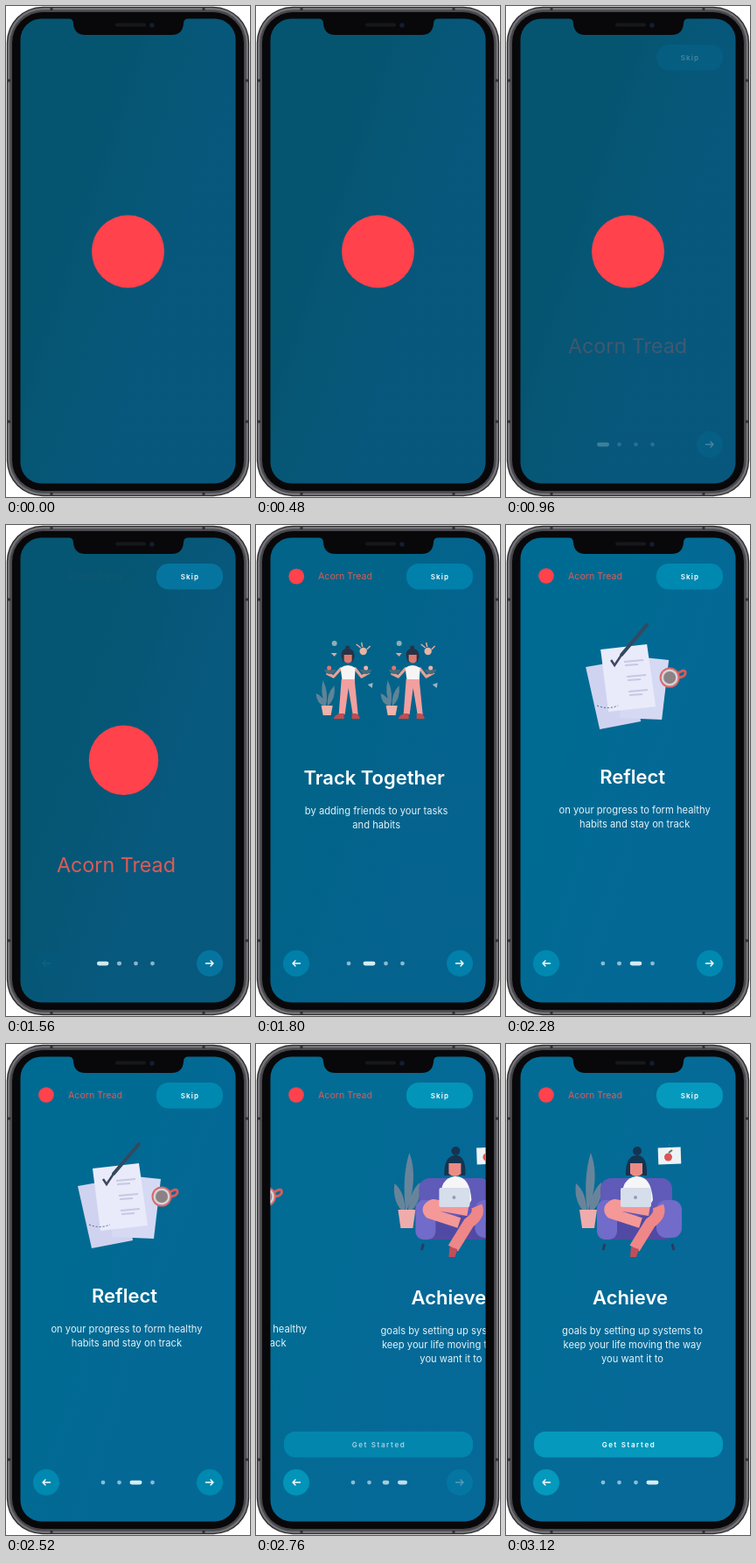
Write an HTML page that moves like this. It is 279 px wide and 560 px high and loops after 3240 ms.

```html
<!DOCTYPE html>
<html lang="en">
<head>
<meta charset="utf-8">
<title>Onboarding</title>
<style>
  html, body { margin: 0; width: 100%; height: 100%; overflow: hidden; background: #fff; }
  svg { display: block; width: 100%; height: 100%; }
  text { font-family: Inter, "Open Sans", sans-serif; text-anchor: middle; fill: #fff; }
  .heading { font-size: 22px; font-weight: 600; }
  .body { font-size: 11.2px; fill: #e3f3f8; }
  .label { font-size: 8px; font-weight: 600; letter-spacing: 1.2px; }
  .brand { fill: #dc5b56; }
  .arrow { fill: none; stroke: #fff; stroke-width: 1.4; stroke-linecap: round; stroke-linejoin: round; }
</style>
</head>
<body>
<svg viewBox="0 0 279 560">
  <defs>
    <clipPath id="screen"><rect x="16.500" y="14.500" width="246" height="530" rx="24"/></clipPath>
    <linearGradient id="sheen" gradientUnits="userSpaceOnUse" x1="40" y1="270" x2="230" y2="333">
      <stop offset=".1" stop-color="#1060a0" stop-opacity="0"/>
      <stop offset=".75" stop-color="#1060a0" stop-opacity=".25"/>
    </linearGradient>
    <g id="juggler">
      <g fill="#5e8498">
        <path d="M79 207Q72 191 76 177Q83 192 79 207M79 207Q68 204 68 192Q78 196 79 207M81 207Q80 192 89 183Q91 198 81 207"/>
      </g>
      <path d="M74 206h13l-2 11h-9z" fill="#eeb3a9"/>
      <path d="M97 163L88 173L80 169M112 163L120 173L129 168" fill="none" stroke="#e7a196" stroke-width="3.2" stroke-linejoin="round"/>
      <path d="M77 165h14q-2 5-7 5t-7-5M118 165h14q-2 5-7 5t-7-5" fill="#426c7e"/>
      <circle cx="83" cy="163" r="2.5" fill="#e5756e"/><circle cx="125" cy="163" r="2.5" fill="#e8b4a8"/>
      <path d="M96 163q8-6 17 0l-1 15h-14z" fill="#f6f5f4"/>
      <path d="M97 176h15l4 40h-6l-5-30l-4 30h-7z" fill="#f2a09f"/>
      <path d="M88 221q1-4 7-6h5v6zM109 215h5q4 2 4 6h-9z" fill="#c14c4c"/>
      <path d="M97 150q-1-9 7-9t8 9l-2 6h-11z" fill="#283246"/>
      <path d="M100 148h9v7q-4 5-9 0z" fill="#dd7a70"/>
      <circle cx="104" cy="140" r="2.5" fill="#283246"/>
      <circle cx="89" cy="135" r="3" fill="#8eaeb9"/>
      <path d="M85 146h7l-3 4z" fill="#e5a59c"/>
      <circle cx="122" cy="144" r="4.2" fill="#e7b5a4"/><path d="M119 140l-5-4M121 139l-1-5M126 142l4-4" stroke="#e9aaa0" stroke-width="1.4"/>
      <path d="M127 182l6-2l-1 6z" fill="#9db6c4"/>
    </g>
  </defs>

  <!-- phone body: dark rim, bright metal, darker metal, bezel -->
  <rect x=".8" y=".8" width="277.4" height="558.4" rx="41" fill="#2a2a2d"/>
  <rect x="2" y="2" width="275" height="556" rx="40" fill="#737378"/>
  <rect x="4.500" y="4.500" width="270" height="551" rx="37.500" fill="#48484c"/>
  <rect x="7" y="7" width="265" height="546" rx="35" fill="#08080a"/>
  <path d="M1 85H5M274 85H278M1 474H5M274 474H278M52 1V5M226 1V5M52 555V559M226 555V559" stroke="#303034" stroke-width="3"/>

  <g clip-path="url(#screen)">
    <rect id="backdrop" x="16" y="14" width="247" height="531"/>
    <rect x="16" y="14" width="247" height="531" fill="url(#sheen)"/>

    <g class="page"><text id="title" class="brand" x="139" y="396" font-size="23.3">Acorn Tread</text></g>

    <g class="page">
      <use href="#juggler"/><use href="#juggler" x="74"/>
      <text class="heading" x="134.5" y="296">Track Together</text>
      <text class="body" x="137" y="330">by adding friends to your tasks</text>
      <text class="body" x="137" y="346">and habits</text>
    </g>

    <g class="page"><g transform="translate(-9)">
      <path d="M91 162L143 153L154 224L107 233Z" fill="#cfd3ef"/>
      <path d="M137 149L186 154L178 222L130 220Z" fill="#d6d9f3"/>
      <path d="M108 142L161 136L171 207L117 213Z" fill="#e9ebfb"/>
      <path d="M135 156l22-2M136 160l15-1M138 173l22-2M139 177l15-1M140 190l22-2M141 194l15-1" stroke="#c5c9e2" stroke-width="2"/>
      <path d="M104 206q12 5 24 0" fill="none" stroke="#59618c" stroke-dasharray="2 2"/>
      <path d="M120 154l4 6l8-12" fill="none" stroke="#3e4760" stroke-width="2.5"/>
      <path d="M132 148L161 114" stroke="#33495f" stroke-width="4" stroke-linecap="round"/>
      <path d="M195 170q10-7 10-1q0 4-8 5" fill="none" stroke="#d75c59" stroke-width="3"/>
      <circle cx="187" cy="174" r="11.5" fill="#d9696a"/><circle cx="187" cy="174" r="9.5" fill="#d5d3d7"/><circle cx="187" cy="174" r="7" fill="#8c8286"/>
      <text class="heading" x="144.5" y="295">Reflect</text>
      <text class="body" x="147" y="329">on your progress to form healthy</text>
      <text class="body" x="147" y="345">habits and stay on track</text>
    </g></g>

    <g class="page">
      <g fill="#68849a">
        <path d="M93 193Q88 151 97 124Q108 154 93 193M92 194Q77 181 80 159Q93 170 92 194M95 194Q97 168 109 158Q112 181 95 194"/>
      </g>
      <path d="M84 189h20l-3 21h-14z" fill="#efacad"/>
      <rect x="174" y="118" width="26" height="19" fill="#edf2f6" transform="rotate(-2 187 128)"/>
      <path d="M187 118v-5" stroke="#426f8a"/>
      <circle cx="185.5" cy="129" r="4.5" fill="#da5557"/><path d="M186 124l4-3" stroke="#517f62" stroke-width="2"/>
      <path d="M113 228l-2 7M190 228l2 7" stroke="#263d63" stroke-width="3"/>
      <rect x="108" y="153" width="82" height="52" rx="12" fill="#605ab8"/>
      <rect x="116" y="196" width="72" height="27" rx="5" fill="#514aa4"/>
      <rect x="104" y="178" width="23" height="45" rx="9" fill="#716bc9"/>
      <rect x="172" y="178" width="29" height="43" rx="11" fill="#716bc9"/>
      <path d="M137 150q-1-22 12-23t12 23z" fill="#143451"/><circle cx="150" cy="122" r="5" fill="#143451"/>
      <path d="M142 136h14v12q-7 6-14 0z" fill="#ec8b85"/>
      <path d="M132 179q0-27 17-28t19 27l-4 7h-29z" fill="#f6f5f7"/>
      <path d="M174 185q4 10-9 19l-18 29" fill="none" stroke="#ef8788" stroke-width="13" stroke-linejoin="round"/>
      <path d="M164 190L124 183q-9 4-4 10l34 11" fill="none" stroke="#f59898" stroke-width="12" stroke-linejoin="round"/>
      <path d="M143 231l9 3l-3 9h-7z" fill="#bf4e5a"/>
      <rect x="131" y="164" width="35" height="22" rx="2" fill="#d5deea"/><circle cx="148" cy="175" r="2" fill="#8f9eb9"/>
      <text class="heading" x="142" y="297">Achieve</text>
      <text class="body" x="144.5" y="331">goals by setting up systems to</text>
      <text class="body" x="144.5" y="347">keep your life moving the way</text>
      <text class="body" x="144.5" y="363">you want it to</text>
    </g>

    <circle id="mark" fill="#ff424b"/>
    <text id="headerName" class="brand" x="102" y="62" font-size="10.6">Acorn Tread</text>

    <g id="controls">
      <rect class="button" x="172" y="44" width="76" height="29.5" rx="14"/>
      <text class="label" x="210.5" y="62">Skip</text>
      <g id="dots"></g>
      <g id="next"><circle class="button" cx="233" cy="500" r="15"/><path class="arrow" d="M228.5 500h8.5m-3-3l3 3l-3 3"/></g>
    </g>
    <g id="back"><circle class="button" cx="46" cy="500" r="15"/><path class="arrow" d="M50.5 500h-8.5m3-3l-3 3l3 3"/></g>
    <g id="start">
      <rect class="button" x="32" y="442" width="216" height="29.5" rx="13"/>
      <text class="label" x="140.5" y="460" style="letter-spacing:1.6px">Get Started</text>
    </g>
  </g>

  <path d="M72 14Q77 15 77 20Q78 33 91 33H189Q202 33 203 20Q203 15 208 14Z" fill="#08080a"/>
  <rect x="125" y="19.5" width="35" height="4" rx="2" fill="#17181b"/>
  <circle cx="167" cy="22" r="2.7" fill="#141d33"/>
</svg>
<script>
const LOOP = 3240, STEP = 120, PITCH = 245, SLIDE = 300;
const SLIDE_STARTS = [1511, 2021, 2580];
const BACKDROPS = [[5, 85, 113], [1, 100, 136], [0, 107, 146], [3, 108, 149]];
const BUTTONS = [[5, 116, 159], [0, 128, 170], [0, 137, 176], [4, 153, 189]];
const DOT_X = [111, 129.5, 148.5, 167.5];

const $ = id => document.getElementById(id);
const all = selector => [...document.querySelectorAll(selector)];
const set = (node, values) => {
  for (const key in values) node.setAttribute(key, values[key]);
};
const clamp = v => Math.min(1, Math.max(0, v));
const lerp = (a, b, p) => a + (b - a) * p;
const ease = v => {
  const u = clamp(v);
  return u < .5 ? 2 * u * u : 1 - 2 * (1 - u) ** 2;
};
const near = (i, scroll) => clamp(1 - Math.abs(i - scroll));

function tint(colors, position) {
  const i = Math.min(2, Math.floor(position));
  const mixed = colors[i].map((c, k) => lerp(c, colors[i + 1][k], position - i));
  return `rgb(${mixed.map(Math.round)})`;
}

const pages = all(".page"), buttons = all(".button");
const dots = DOT_X.map(() => {
  const dot = document.createElementNS("http://www.w3.org/2000/svg", "rect");
  set(dot, { y: 497.7, height: 4.8, rx: 2.4, fill: "#e0f5fa" });
  return $("dots").appendChild(dot);
});

function draw(time) {
  const scroll = SLIDE_STARTS.reduce((sum, start) => sum + ease((time - start) / SLIDE), 0);
  const appear = ease((time - 850) / SLIDE);
  const docked = clamp(scroll), last = clamp(scroll - 2);

  set($("backdrop"), { fill: tint(BACKDROPS, scroll) });
  buttons.forEach(b => set(b, { fill: tint(BUTTONS, scroll) }));
  pages.forEach((page, i) => set(page, { transform: `translate(${(i - scroll) * PITCH})` }));
  set($("mark"), { cx: lerp(139.5, 46, docked), cy: lerp(280, 58, docked), r: lerp(41.5, 8.8, docked) });

  set($("title"), { opacity: appear });
  set($("controls"), { opacity: appear });
  set($("headerName"), { opacity: docked });
  set($("back"), { opacity: docked });
  set($("next"), { opacity: 1 - last });
  set($("start"), { opacity: last });

  dots.forEach((dot, i) => {
    const active = near(i, scroll), width = lerp(4.8, 14, active);
    const x = DOT_X[i] - (i === 0 ? 5 * near(1, scroll) : 0);
    set(dot, { x: x - width / 2, width, opacity: lerp(.6, .95, active) });
  });
}

function frame() {
  const time = performance.now() % LOOP;
  draw(Math.floor(time / STEP) * STEP);
  requestAnimationFrame(frame);
}
frame();
</script>
</body>
</html>
```
